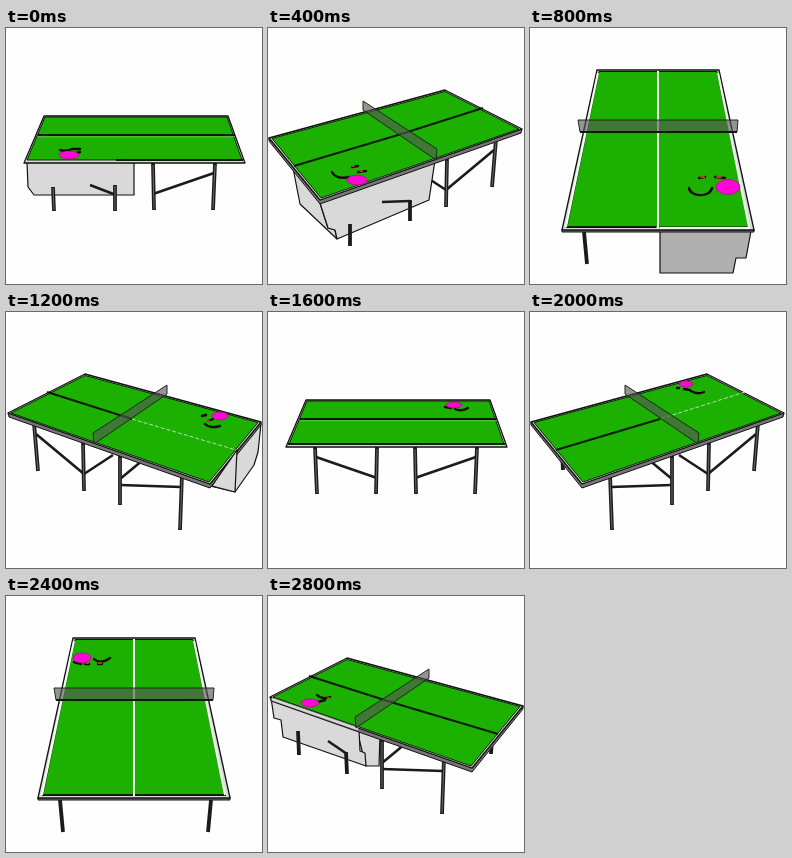
An HTML page without scripts that plays this animation: 256 px wide and 256 px high, repeating every 3.2 s.

```html
<!DOCTYPE html>
<html lang="en">
<head>
<meta charset="utf-8">
<title>Turning table</title>
<style>
  html, body { margin: 0; width: 100%; height: 100%; overflow: hidden; background: #fefefe; }
  svg { display: block; width: 100vw; height: 100vh; }

  /* Eight poses, 45 degrees apart, each held for 400 ms */
  .pose { visibility: hidden; animation: hold 3.2s step-end infinite; animation-delay: calc(var(--i) * .4s - 3.2s); }
  @keyframes hold {
    0% { visibility: visible; }
    12.5%, 100% { visibility: hidden; }
  }

  .top { fill: #1cb000; stroke: #0a2206; stroke-width: 1; }
  .rim { fill: #d9ddd8; stroke: #111; stroke-width: 1.3; }
  .lip { fill: #777; stroke: #111; stroke-width: 1; }
  .net { fill: #555; fill-opacity: .62; stroke: #1c2a1a; stroke-width: 1; }
  .box { fill: #d9d9d9; stroke: #111; stroke-width: 1.2; }
  .shade { fill: #b0b0b0; }
  .line { fill: none; stroke: #0a1c06; stroke-width: 2; }
  .white { fill: none; stroke: #f4fff2; stroke-width: 2; }
  .leg { fill: none; stroke: #1b1b1b; stroke-width: 3.8; }
  .core { fill: none; stroke: #686868; stroke-width: 1; }
  .strut { fill: none; stroke: #1b1b1b; stroke-width: 2.6; }
  .bat { fill: #ff08d4; stroke: #a0107c; stroke-width: .7; }
  .dark { fill: none; stroke: #150d0a; stroke-width: 2.4; stroke-linecap: round; }
  .red { fill: none; stroke: #b8401c; stroke-width: 2; stroke-linecap: round; }
</style>
</head>
<body>
<svg viewBox="0 0 256 256" stroke-linejoin="round">
  <defs>
    <!-- Long side facing the viewer -->
    <g id="side">
      <path class="rim" d="M38 88H222L239 135H18Z"/>
      <path class="top" d="M39 89H221L236 132H21Z"/>
      <path class="line" d="M32 107H229"/>
      <path d="M32 108.8H229" stroke="#8fce84" stroke-width=".6"/>
    </g>
    <g id="sideLegs">
      <path class="strut" d="M147 166L208 145"/>
      <path class="leg" d="M147 135L148 182M209 135L207 182"/>
      <path class="core" d="M147 137L148 181M209 137L207 181"/>
    </g>

    <!-- Short end facing the viewer -->
    <g id="end">
      <path class="lip" d="M32 201H224V204H32Z"/>
      <path class="rim" d="M67 42H189L224 202H32Z"/>
      <path class="top" d="M69 43.5H187L219 199H37Z"/>
      <path class="white" d="M128 43V200" stroke-width="2.6"/>
    </g>
    <g id="endNet">
      <path class="net" d="M48 92H208L207 104H50Z"/>
      <path class="line" d="M50 104H207" stroke-width="1.2"/>
    </g>
    <path id="endLeg" class="leg" d="M54 204L57 236"/>

    <!-- Corner view; mirrored for the other diagonal -->
    <g id="corner">
      <path class="lip" d="M2 101L204 172L255 110V113L204 176L3 105Z"/>
      <path class="rim" d="M2 101L79 62L255 110L204 172Z"/>
      <path class="top" d="M5 101L79 63.5L252 110.5L203 170Z"/>
    </g>
    <path id="leftLine" class="line" d="M41 80L126 107"/>
    <path id="rightLine" class="line" d="M126 107L230 138"/>
    <path id="cornerNet" class="net" d="M87 121L161 73V82L88 132Z"/>
    <g id="leftLegs">
      <path class="strut" d="M30 122L78 162L107 143"/>
      <path class="leg" d="M28 111L32 159M77 130L78 179"/>
      <path class="core" d="M28 113L32 158M77 133L78 178"/>
    </g>
    <g id="rightLegs">
      <path class="strut" d="M114 173L175 175M114 167L137 148"/>
      <path class="leg" d="M114 143V193M176 162L174 218"/>
      <path class="core" d="M114 146V192M176 166L174 217"/>
    </g>
    <g id="farLeg">
      <path class="strut" d="M206 156L227 145"/>
      <path class="leg" d="M224 140L223 158"/>
    </g>
  </defs>

  <g class="pose" style="--i:0">
    <path class="box" d="M21 134H128V167H28L22 159Z"/>
    <path class="strut" d="M84 157L110 167"/>
    <path class="leg" d="M47 159L48 183M109 157V183"/>
    <path class="core" d="M47 160L48 182M109 158V182"/>
    <use href="#sideLegs"/>
    <use href="#side"/>
    <path class="line" d="M110 132H237"/>
    <path class="dark" d="M54 122Q60 124 66 121L74 121M67 126L74 124"/>
    <ellipse class="bat" cx="63" cy="127" rx="10" ry="4"/>
  </g>

  <g class="pose" style="--i:1">
    <use href="#leftLegs" transform="matrix(-1 0 0 1 256 0)"/>
    <path class="box" d="M25 140L52 175L60 200L67 202L69 211L32 176Z"/>
    <path class="box" d="M52 175L167 132L161 172L69 211L67 202L60 200Z"/>
    <path class="strut" d="M114 174L142 173"/>
    <path class="leg" d="M82 196V218M142 172V193"/>
    <g transform="matrix(-1 0 0 1 256 0)">
      <use href="#corner"/>
      <use href="#leftLine"/>
      <use href="#rightLine"/>
      <use href="#cornerNet"/>
    </g>
    <path class="dark" d="M64 144Q68 152 81 149M84 139L90 138M90 144L98 143"/>
    <path class="red" d="M84 138H86M92 143H94"/>
    <ellipse class="bat" cx="89" cy="152" rx="10" ry="5"/>
  </g>

  <g class="pose" style="--i:2">
    <use href="#endLeg"/>
    <path class="box shade" d="M130 203H221L216 230H206L203 245H130Z"/>
    <use href="#end"/>
    <path class="line" d="M36 199H126"/>
    <path class="white" d="M130 200H220M188 45L219 199M68 45L36 199" stroke-width="1.2"/>
    <use href="#endNet"/>
    <path class="dark" d="M159 160C160 169 180 170 182 160M169 150L175 149M185 149L195 150"/>
    <path class="red" d="M171 149H174M187 149H191"/>
    <ellipse class="bat" cx="198" cy="159" rx="12" ry="7.5"/>
  </g>

  <g class="pose" style="--i:3">
    <use href="#leftLegs"/>
    <use href="#rightLegs"/>
    <path class="box" d="M204 174L231 138L255 112L252 140L248 153L229 180Z"/>
    <use href="#corner"/>
    <path class="box" d="M231 138L229 180L206 174Z"/>
    <use href="#leftLine"/>
    <path d="M126 107L230 138" stroke="#b9dcb2" stroke-dasharray="4 2"/>
    <use href="#cornerNet"/>
    <path class="dark" d="M199 112Q204 117 214 114M196 104L200 103M202 109L207 107"/>
    <path class="red" d="M201 109H203"/>
    <ellipse class="bat" cx="214" cy="104" rx="8" ry="4"/>
  </g>

  <g class="pose" style="--i:4">
    <use href="#sideLegs"/>
    <use href="#sideLegs" transform="matrix(-1 0 0 1 256 0)"/>
    <use href="#side"/>
    <path class="line" d="M20 132H237"/>
    <path class="dark" d="M177 95L183 96M187 97Q194 100 200 96"/>
    <ellipse class="bat" cx="186" cy="93" rx="8" ry="3"/>
  </g>

  <g class="pose" style="--i:5">
    <g transform="matrix(-1 0 0 1 256 0)">
      <use href="#leftLegs"/>
      <use href="#rightLegs"/>
      <use href="#farLeg"/>
      <use href="#corner"/>
      <use href="#rightLine"/>
      <path d="M41 80L126 107" stroke="#b9dcb2" stroke-dasharray="4 2"/>
      <use href="#cornerNet"/>
    </g>
    <path class="dark" d="M147 76H149M154 77L160 78M161 79Q167 83 174 80"/>
    <ellipse class="bat" cx="156" cy="72" rx="7" ry="3"/>
  </g>

  <g class="pose" style="--i:6">
    <use href="#endLeg"/>
    <use href="#endLeg" transform="matrix(-1 0 0 1 259 0)"/>
    <use href="#end"/>
    <path class="line" d="M36 199H220"/>
    <path class="white" d="M128 43V200M188 45L219 199M68 45L36 199" stroke-width="1.2"/>
    <use href="#endNet"/>
    <path class="dark" d="M68 66L75 68M79 68H83M88 63Q94 69 104 62M92 68H96"/>
    <path class="red" d="M80 67H82M93 67H95"/>
    <ellipse class="bat" cx="76" cy="62" rx="9" ry="5"/>
  </g>

  <g class="pose" style="--i:7">
    <use href="#rightLegs"/>
    <use href="#farLeg"/>
    <path class="box" d="M88 131L112 140L111 170H98Z"/>
    <path class="box" d="M3 102L6 122L13 124L15 141L98 170L97 157L92 155L91 133Z"/>
    <path class="strut" d="M60 145L79 158"/>
    <path class="leg" d="M30 135L31 159M78 156L79 178"/>
    <use href="#corner"/>
    <path d="M4 103L90 133" stroke="#d9d9d9" stroke-width="2.4"/>
    <use href="#leftLine"/>
    <use href="#rightLine"/>
    <use href="#cornerNet"/>
    <path class="dark" d="M49 99Q54 104 62 101M50 106L57 104"/>
    <path class="red" d="M60 102H61"/>
    <ellipse class="bat" cx="42" cy="107" rx="9" ry="4"/>
  </g>
</svg>
</body>
</html>
```
